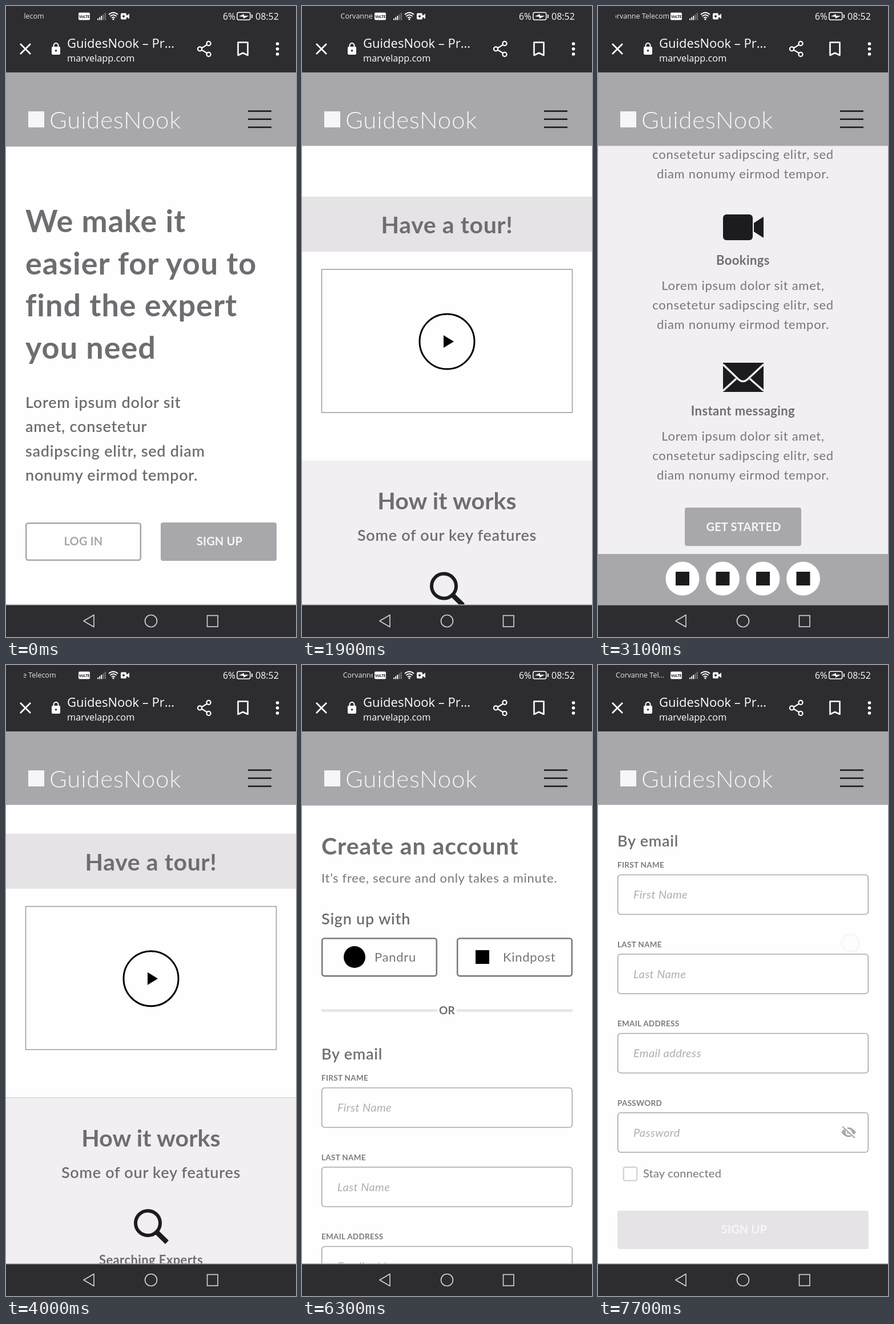
An HTML page for the animation above (8 s loop, 508 px wide and 1102 px high).

```html
<!DOCTYPE html>
<html lang="en">
<head>
<meta charset="utf-8">
<title>Mobile prototype</title>
<style>
html, body { margin: 0; height: 100%; overflow: hidden; background: #2d2d31; }
svg { display: block; width: 100vw; height: 100vh; }
text { font-family: Lato, sans-serif; fill: #6f6d71; white-space: pre; }
.ui { font-family: "Open Sans", "Noto Sans", sans-serif; fill: #fff; }
.hero { font-size: 54px; font-weight: 700; letter-spacing: 1px; }
.title { font-size: 41px; font-weight: 700; letter-spacing: .6px; }
.lead { font-size: 27px; font-weight: 600; letter-spacing: .75px; }
.name { font-size: 22px; font-weight: 700; letter-spacing: .4px; }
.body { font-size: 22px; letter-spacing: .7px; fill: #78767a; }
.btn { font-size: 20px; font-weight: 700; letter-spacing: .2px; }
.label { font-size: 13.5px; font-weight: 700; letter-spacing: .3px; fill: #7c7a7e; }
.hint { font-size: 20px; font-style: italic; letter-spacing: .4px; fill: #b0aeb3; }
.mid { text-anchor: middle; }
.light { fill: #f6f5f8; }
.line { fill: none; stroke: #fff; }
</style>
</head>
<body>
<svg id="stage" viewBox="0 0 508 1102" preserveAspectRatio="none"></svg>
<script>
const INK = '#1c1c1e', GREY = '#a8a7ac', BAND = '#e5e3e6', PALE = '#f1eff2', DARK = '#2d2d31';
const LOOP = 8000, STEP = 100, LAST = 7700, SIGNUP_AT = 5700, MARQUEE_END = 7300;

const text = (cls, x, y, s, extra = '') => `<text class="${cls}" x="${x}" y="${y}" ${extra}>${s}</text>`;
const mid = (cls, y, s, x = 254) => text(cls + ' mid', x, y, s);
const lines = (cls, x, y, gap, list) => list.map((s, i) => text(cls, x, y + i * gap, s)).join('');
const rect = (x, y, w, h, fill, extra = '') =>
  `<rect x="${x}" y="${y}" width="${w}" height="${h}" fill="${fill}" ${extra}/>`;
const frame = (x, y, w, h, color, width, r = 0) =>
  rect(x, y, w, h, 'none', `stroke="${color}" stroke-width="${width}" rx="${r}"`);
const circle = (x, y, r, fill, extra = '') => `<circle cx="${x}" cy="${y}" r="${r}" fill="${fill}" ${extra}/>`;
const path = (d, width, extra = '') => `<path class="line" d="${d}" stroke-width="${width}" ${extra}/>`;

// Icons are drawn around their own centre.
const search = circle(-5.5, -6, 21.5, 'none', `stroke="${INK}" stroke-width="6"`) +
  `<path d="M9 9L28 27.500" stroke="${INK}" stroke-width="8.5"/>`;
const camera = rect(-35, -22, 52, 45, INK, 'rx="6"') + `<path d="M19 -7L36 -18V19L19 8z" fill="${INK}"/>`;
const envelope = rect(-35, -26, 71, 51, INK) +
  `<path d="M-35 -23L-9 2Q0 11 9 2L36 -23M-35 23L-12 2M36 23L12 2" fill="none" stroke="${PALE}" stroke-width="3.4"/>`;

const features = [[search, 'Searching Experts'], [search, 'Forum'], [camera, 'Bookings'], [envelope, 'Instant messaging']];
const feature = ([icon, name], i) => `<g transform="translate(0 ${1764 + i * 263})">
  <g transform="translate(254 0)">${icon}</g>` + mid('name', 66, name) +
  ['Lorem ipsum dolor sit amet,', 'consetetur sadipscing elitr, sed', 'diam nonumy eirmod tempor.']
    .map((s, k) => mid('body', 110 + k * 34, s)).join('') + '</g>';

const home = rect(0, 116, 508, 1423, '#fefefe') +
  lines('hero', 34, 395, 73.5, ['We make it', 'easier for you to', 'find the expert', 'you need']) +
  lines('lead', 34, 702, 42.4, ['Lorem ipsum dolor sit', 'amet, consetetur', 'sadipscing elitr, sed diam', 'nonumy eirmod tempor.']) +
  frame(35.2, 903.2, 200.6, 64.6, GREY, 2.6, 4) + text('btn mid', 135.5, 942, 'LOG IN', `style="fill:${GREY}"`) +
  rect(271, 902, 203, 67, GREY, 'rx="4"') + mid('btn light', 942, 'SIGN UP', 374) +
  rect(0, 1078, 508, 96, BAND) + mid('title', 1142, 'Have a tour!') +
  frame(34.5, 1205, 439, 250, '#a0a0a2', 1.6) +
  circle(254, 1331, 48, 'none', 'stroke="#000" stroke-width="3"') + '<path d="M248 1320L266 1331L248 1342z"/>' +
  rect(0, 1539, 508, 1322, PALE) +
  text('title mid', 254, 1624, 'How it works', 'style="letter-spacing:.1px"') +
  mid('lead', 1679, 'Some of our key features') +
  features.map(feature).join('') +
  rect(152, 2780, 204, 67, GREY, 'rx="4"') + mid('btn light', 2821, 'GET STARTED', 255) +
  rect(0, 2861, 508, 89, GREY) +
  [148, 218.5, 289, 359.5].map(x => circle(x, 2904, 29.5, '#fff') + rect(x - 12, 2892, 24, 24, INK)).join('');

const field = (name, i) => {
  const y = 738.5 + i * 138.5;
  return text('label', 34, y - 12.5, name.toUpperCase()) +
    frame(34.7, y, 438.6, 69, GREY, 1.6, 5) + text('hint', 62, y + 41.5, name);
};
const eye = `<g transform="translate(439 1188)">
  <path d="M-13 0Q0 -17 13 0Q0 17 -13 0z" fill="${GREY}"/>${circle(0, 0, 5.5, '#fefefe')}${circle(0, 0, 3, GREY)}
  <path d="M-10 -11L12 10" stroke="#fefefe" stroke-width="5"/><path d="M-11 -10L11 10" stroke="${GREY}" stroke-width="2"/></g>`;

const signup = rect(0, 116, 508, 1400, '#fefefe') +
  text('title', 34, 331, 'Create an account', 'style="letter-spacing:.95px"') +
  text('body', 34, 380, 'It’s free, secure and only takes a minute.') +
  text('lead', 34, 453, 'Sign up with') +
  [35.2, 272.2].map(x => frame(x, 477.5, 200.6, 65.6, '#7c7a7e', 2.6, 4)).join('') +
  circle(92, 510, 19, '#000') + text('body', 127, 518, 'Pandru') +
  rect(304, 498, 24, 24, '#000') + text('body', 352, 518, 'Kindpost') +
  rect(34, 601.5, 203, 4, BAND) + rect(271, 601.5, 203, 4, BAND) +
  text('btn mid', 254, 610, 'OR', 'style="font-size:19px"') +
  text('lead', 34, 689, 'By email') +
  ['First Name', 'Last Name', 'Email address', 'Password'].map(field).join('') + eye +
  frame(44.7, 1249, 23.5, 23.5, '#cfcdd2', 2, 3) +
  text('body', 79, 1267, 'Stay connected', 'style="font-size:20px;letter-spacing:.2px"') +
  rect(34, 1325, 440, 67, BAND, 'rx="4"') + mid('btn light', 1365, 'SIGN UP', 256);

const statusBar =
  rect(127, 11.5, 20, 13, '#fff', 'rx="2"') +
  text('ui mid', 137, 21, 'VoLTE', `style="fill:${DARK};font-size:7px;font-weight:700;letter-spacing:-.4px"`) +
  [0, 1, 2, 3, 4].map(i => rect(160 + i * 3.2, 22 - i * 2.5, 2, 2.5 + i * 2.5, i < 3 ? '#fff' : '#77777b')).join('') +
  path('M180 15Q188 8 196 15M182.5 18Q188 13 193.5 18M185 21Q188 18 191 21', 1.7) + circle(188, 23, 1.6, '#fff') +
  rect(201, 12.5, 10, 11, '#fff', 'rx="2"') + '<path d="M211 17L216 13.500V22.500L211 19z" fill="#fff"/>' +
  circle(206, 18, 2, DARK) +
  text('ui', 380, 24, '6%', 'font-size="15.6"') +
  frame(404.8, 11.3, 23, 13, '#fff', 1.5, 3) + rect(430, 15, 1.8, 6, '#fff') +
  '<path d="M408 18L417 14V17H425L416 22V19z" fill="#fff"/>' +
  text('ui', 437, 24, '08:52', 'font-size="16"');

const toolbar =
  path('M25 66L43 84M43 66L25 84', 2.6) +
  rect(80, 71, 15, 14, '#fff', 'rx="2"') + path('M83.500 72V69a4 4 0 0 1 8 0V72', 2) + circle(87.5, 78, 1.8, DARK) +
  text('ui', 107, 73, 'GuidesNook – Pr…', 'font-size="22"') +
  text('ui', 107, 97, 'marvelapp.com', 'font-size="16.3"') +
  path('M340 75L355 66M340 75L355 84', 2.2) +
  [[339.5, 75], [355, 65.5], [355, 84.5]].map(([x, y]) => circle(x, y, 3.6, DARK, 'stroke="#fff" stroke-width="2.2"')).join('') +
  path('M406.500 63.500H423.500V86L415 82L406.500 86z', 2.6, 'stroke-linejoin="round"') +
  [66, 75, 84].map(y => circle(475.5, y, 2.8, '#fff')).join('');

const navBar = rect(0, 1045, 508, 2, '#b4b3b7') + rect(0, 1046.5, 508, 56, DARK) +
  `<g opacity=".8">` + path('M136 1074L154 1063.500V1084.500z', 1.6, 'stroke-linejoin="round"') +
  circle(254, 1074, 10.5, 'none', 'stroke="#fff" stroke-width="1.6"') + frame(352.5, 1064.5, 18.5, 19.5, '#fff', 1.6) + '</g>';

stage.innerHTML = `<clipPath id="carrierClip"><rect x="31" y="6" width="93" height="24"/></clipPath>
  <g id="home">${home}</g><g id="signup">${signup}</g>
  ${rect(0, 116, 508, 129.5, GREY, 'id="header"')}
  ${rect(39, 184, 28, 28, '#f6f5f8')}
  ${text('light', 76, 214, 'GuidesNook', 'font-size="42" font-weight="300" letter-spacing=".8"')}
  ${[183.6, 197.7, 211.8].map(y => rect(424, y - 1.3, 41, 2.6, INK)).join('')}
  ${rect(0, 0, 508, 116, DARK)}
  <g clip-path="url(#carrierClip)" font-size="12.5" opacity=".88">
    ${text('ui', 0, 22, '', 'id="carrier"')}${text('ui', 0, 22, '', 'id="carrierNext"')}</g>
  ${statusBar}${toolbar}${navBar}
  <g id="touch">${circle(0, 0, 16.5, 'none', 'stroke="#c8c8dc" stroke-opacity=".5"')}
  ${circle(0, 0, 15, '#f4f4f8', 'fill-opacity=".75" stroke="#a9a8c4" stroke-opacity=".8" stroke-width="1.4"')}</g>`;

const homeScroll = [[1050, 0], [1300, 60], [1600, 325], [1800, 640], [2000, 850], [2060, 864], [2400, 1187],
  [2600, 1560], [2800, 1780], [3000, 1890], [3100, 1904], [3400, 1904], [3700, 1544], [3900, 1000],
  [4200, 350], [4400, 60], [4500, 0]];
const signupScroll = [[6800, 0], [7000, 70], [7200, 190], [7400, 320], [7550, 372]];

// Each touch: start, end, x, and the y it would have at scroll 0.
const touches = [[1000, 1640, 447, 907], [2050, 2400, 396, 1924], [3300, 3640, 400, 2604],
  [5100, 5250, 354, 941], [6700, 7550, 442, 858]];
const FADE = 180;

function along(keys, t) {
  const i = keys.findIndex(k => k[0] > t);
  if (i === 0) return keys[0][1];
  if (i < 0) return keys[keys.length - 1][1];
  const [t0, a] = keys[i - 1], [t1, b] = keys[i];
  return a + (b - a) * (t - t0) / (t1 - t0);
}
const scrollAt = t => along(t < SIGNUP_AT ? homeScroll : signupScroll, t);
const byId = id => document.getElementById(id);

function drawCarrier(t) {
  const period = 188, moving = t < MARQUEE_END;
  const shift = (72 + 0.0418 * t) % period;
  const main = byId('carrier'), next = byId('carrierNext');
  main.textContent = moving ? 'Corvanne Telecom' : 'Corvanne Tel…';
  main.setAttribute('x', moving ? 31 - shift : 31);
  next.textContent = moving ? 'Corvanne Telecom' : '';
  next.setAttribute('x', 31 - shift + period);
}

function drawTouch(t) {
  const touch = touches.find(([a, b]) => t >= a && t < b + FADE);
  const node = byId('touch');
  if (!touch) return node.setAttribute('opacity', 0);
  const [, end, x, base] = touch;
  node.setAttribute('opacity', Math.min(1, 1 - (t - end) / FADE));
  node.setAttribute('transform', `translate(${x} ${base - scrollAt(Math.min(t, end))})`);
}

function draw(now) {
  const t = Math.min(LAST, Math.floor(now % LOOP / STEP) * STEP);
  const scroll = scrollAt(t), onHome = t < SIGNUP_AT;
  byId('home').style.display = onHome ? '' : 'none';
  byId('signup').style.display = onHome ? 'none' : '';
  byId(onHome ? 'home' : 'signup').setAttribute('transform', `translate(0 ${-scroll})`);
  byId('header').setAttribute('height', scroll ? 128.3 : 129.5);
  drawCarrier(t);
  drawTouch(t);
}

const start = performance.now();
function tick() {
  draw(performance.now() - start);
  requestAnimationFrame(tick);
}
tick();
</script>
</body>
</html>
```
